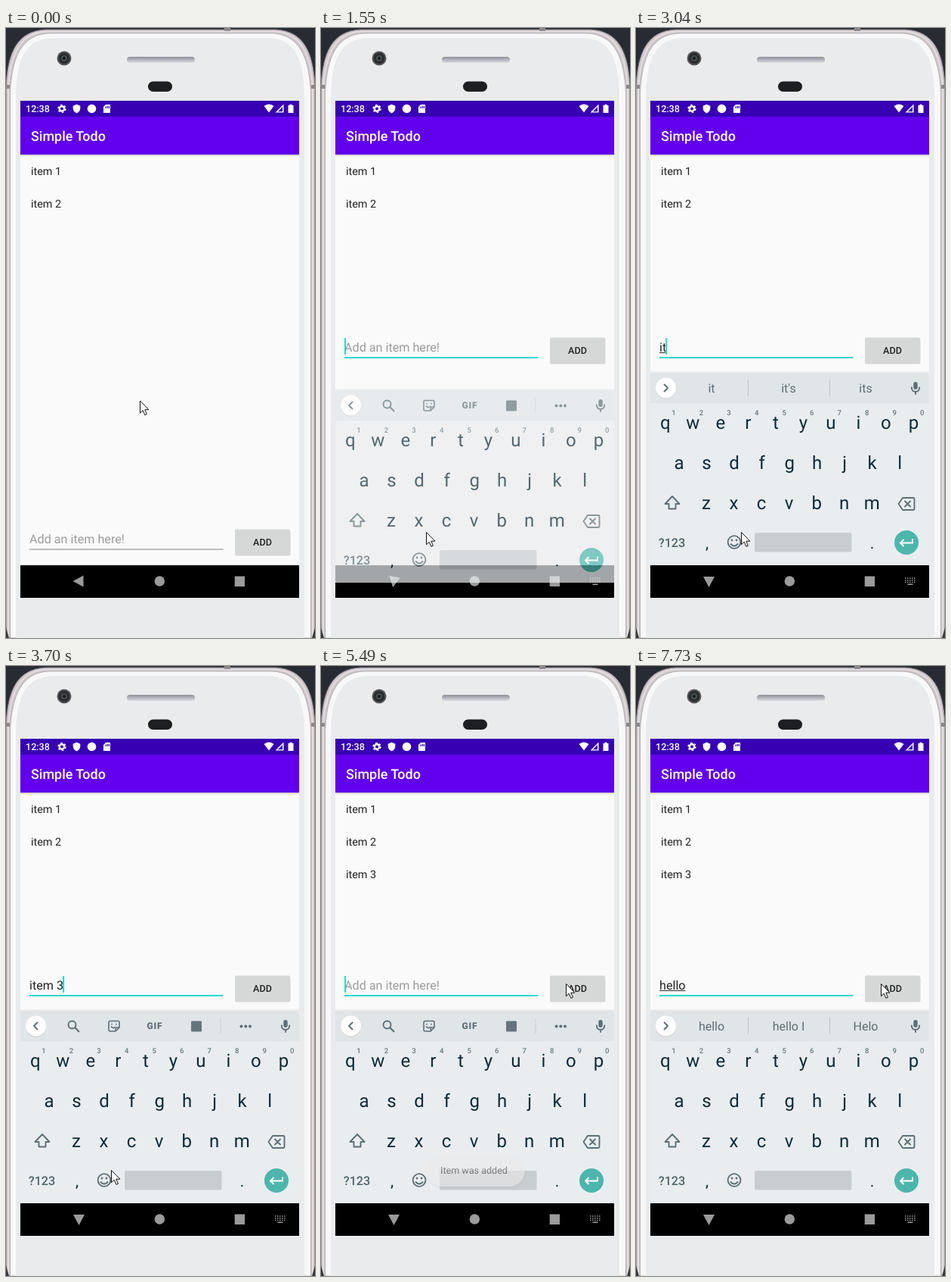
These frames come from a looping animation (409x805 px, 8000 ms). An HTML page:

```html
<!DOCTYPE html>
<html lang="en">
<head>
<meta charset="utf-8">
<title>Simple Todo</title>
<style>
html, body { margin: 0; width: 100%; height: 100%; overflow: hidden; background: #292b33; }
svg { display: block; width: 409px; height: 805px; font-family: Roboto, "Noto Sans", sans-serif; text-rendering: geometricPrecision; }
text { white-space: pre; }
.line { fill: none; stroke: #5f6f76; stroke-width: 1.9; stroke-linejoin: round; stroke-linecap: round; }
.mid { text-anchor: middle; }
.item { font-size: 14.4px; fill: #222; }
.field { font-size: 16.16px; }
.key { font-size: 24px; fill: #0f2b36; text-anchor: middle; }
.digit { font-size: 9.5px; fill: #687981; text-anchor: middle; font-weight: 500; }
.word { font-size: 16px; fill: #5f6d74; text-anchor: middle; }
</style>
</head>
<body>
<svg viewBox="0 0 409 805">
  <defs>
    <linearGradient id="slot" x2="0" y2="1">
      <stop stop-color="#8f9099"/><stop offset=".5" stop-color="#b3b5bd"/><stop offset="1" stop-color="#dcdee2"/>
    </linearGradient>
    <linearGradient id="drop" x2="0" y2="1">
      <stop stop-color="#000" stop-opacity=".2"/><stop offset="1" stop-color="#000" stop-opacity="0"/>
    </linearGradient>
    <clipPath id="screen"><path d="M19 96H388V752H19Z"/></clipPath>
  </defs>

  <!-- phone -->
  <path d="M0 805V78C2 30 16 4 52 2H357C393 4 407 30 409 78V805Z" fill="#cdc6c9" stroke="#77707a"/>
  <path d="M3 805V82C5 33 19 6 54 4.500H355C390 6 404 33 406 82V805" fill="none" stroke="#e3dde0" stroke-width="2"/>
  <path d="M5.500 805V85C8 36 22 9 56 7H353C387 9 401 36 403.500 85V805Z" fill="#f8f8f8" stroke="#aaa4a9" stroke-width=".8"/>
  <path d="M13 805V88C14 42 26 15 60 13H349C383 15 394 42 395 88V805Z" fill="#e9ebec"/>
  <path d="M0 75H5V80H0ZM404 75H409V80H404ZM289 0H297V4H289Z" fill="#8d888c"/>
  <path d="M0 791L4 805H0ZM409 791L405 805H409Z" fill="#393a3e"/>
  <circle cx="77" cy="40" r="9.500" fill="#57585c"/>
  <circle cx="77" cy="40" r="7.500" fill="#2b2c30"/>
  <circle cx="77" cy="40" r="4" fill="#44504f"/>
  <circle cx="77" cy="40" r="2" fill="#17191b"/>
  <rect x="160" y="38" width="90" height="8" rx="4" fill="url(#slot)"/>
  <rect x="188" y="70.500" width="32" height="13.500" rx="6.700" fill="#1d1e21"/>

  <g clip-path="url(#screen)">
    <path d="M19 96H388V752H19Z" fill="#fafafa"/>
    <path d="M19 167H388V170H19Z" fill="url(#drop)"/>
    <path d="M19 96H388V118H19Z" fill="#3700b3"/>
    <path d="M19 117H388V167H19Z" fill="#6200ee"/>
    <text x="33" y="149" font-size="17.960" font-weight="500" fill="#fff">Simple Todo</text>

    <!-- status bar -->
    <g fill="#fff">
      <text x="26" y="111.300" font-size="12.570" font-weight="500">12:38</text>
      <circle cx="74" cy="106.500" r="3.200" fill="none" stroke="#fff" stroke-width="2.400"/>
      <circle cx="74" cy="106.500" r="4.900" fill="none" stroke="#fff" stroke-width="1.600" stroke-dasharray="2.566"/>
      <path d="M93.500 100.700L98.300 102.700V106Q98 110.500 93.500 112.500Q89 110.500 88.700 106V102.700Z"/>
      <circle cx="113.500" cy="106.500" r="5.800"/>
      <path fill-rule="evenodd" d="M132 101H138V112H129V104ZM131.500 103.500V106H132.700V103.500ZM133.700 103V106H134.900V103ZM135.800 103V106H137V103Z"/>
      <path d="M341.500 103Q348 97.800 354.500 103L348 111.500Z"/>
      <path fill-rule="evenodd" d="M367.500 100.500V111.500H356.500ZM366 104L360 110.200H366Z"/>
      <path d="M373.500 102H375.500V100.700H378.500V102H380.500V112H373.500Z"/>
    </g>

    <text class="item" x="33" y="194.300">item 1</text>
    <text class="item" x="33" y="237.300">item 2</text>
    <text class="item" x="33" y="280.300" id="added">item 3</text>

    <!-- input row -->
    <g id="row">
      <text class="field" x="31" y="426.600" fill="#9c9c9c" id="hint">Add an item here!</text>
      <text class="field" x="31" y="426.600" fill="#222" id="typed"></text>
      <rect x="31" y="428" height="1" fill="#333" id="compose"/>
      <rect x="31" y="409" width="2" height="22" fill="#2bd8ca" id="caret"/>
      <rect x="31" width="256.500" id="rule"/>
      <rect x="303" y="410" width="73.500" height="33.500" rx="2" fill="#000" opacity=".14"/>
      <rect x="303" y="408.500" width="73" height="33.500" rx="2" id="button"/>
      <text class="mid" x="339.500" y="430" font-size="12.570" font-weight="500" fill="#222">ADD</text>
    </g>

    <!-- navigation bar -->
    <path d="M19 709H388V752H19Z" fill="#000"/>
    <g fill="#9b9b9b">
      <path d="M88.500 730L102.500 722.500V737.500Z" id="back"/>
      <circle cx="203.300" cy="730" r="6.700"/>
      <path d="M302.700 723.500H316V737H302.700Z"/>
      <g id="switch"></g>
    </g>

    <!-- keyboard -->
    <g id="board">
      <path d="M19 455H388V709H19Z" fill="#e9edf0"/>
      <path d="M19 455H388V495H19Z" fill="#e0e5e8"/>
      <path d="M19 453H388V455H19Z" fill="#000" opacity=".05"/>
      <circle cx="39.500" cy="476" r="13.500" fill="#000" opacity=".1"/>
      <circle cx="39.500" cy="475" r="13.500" fill="#fff"/>
      <path class="line" id="chevron"/>
      <g id="tools">
        <circle class="line" cx="87.500" cy="473.500" r="5"/>
        <path class="line" d="M91.300 477.300L96.300 482.300" style="stroke-width:2.200"/>
        <path class="line" d="M138 468.500H148Q150 468.500 150 470.500V477L145 482H138Q136 482 136 480V470.500Q136 468.500 138 468.500ZM150 477H146.500Q145 477 145 482M139.500 476Q142 479 144.500 476.500M140 472.500V473M146 472.500V473" style="stroke-width:1.600"/>
        <text class="mid" x="197" y="479.300" font-size="12" font-weight="900" letter-spacing=".8" fill="#5f6f76">GIF</text>
        <rect x="245" y="468.500" width="14" height="14" rx="1" fill="#66757c"/>
        <path d="M284 465V485" stroke="#c9d0d4"/>
        <g fill="#5f6f76"><circle cx="311.500" cy="475.500" r="2"/><circle cx="317.300" cy="475.500" r="2"/><circle cx="323" cy="475.500" r="2"/></g>
      </g>
      <g id="words">
        <path d="M148.500 464V486M256.500 464V486" stroke="#bcc5ca"/>
        <text class="word" x="100" y="481.300"></text>
        <text class="word" x="202" y="481.300"></text>
        <text class="word" x="304" y="481.300"></text>
      </g>
      <rect x="367.300" y="467" width="5.400" height="10" rx="2.700" fill="#5f6f76"/>
      <path class="line" d="M364.800 474.500Q365 480 370 480T375.200 474.500M370 480V483"/>
      <g id="keys"></g>
      <path class="line" d="M48 618L57.500 628H52.500V634.500H43.500V628H38.500Z"/>
      <path class="line" d="M353 620H367Q368.500 620 368.500 621.500V634.500Q368.500 636 367 636H353L347.500 628ZM356 624.500L363 631.500M363 624.500L356 631.500"/>
      <text class="mid" x="47.500" y="684.500" font-size="16.200" font-weight="500" fill="#52646c">?123</text>
      <text class="key" x="94" y="687" style="font-size:21px">,</text>
      <text class="key" x="312.500" y="687" style="font-size:21px">.</text>
      <circle class="line" cx="130" cy="678.500" r="8.400"/>
      <path class="line" d="M125.500 681Q130 686 134.500 681"/>
      <g fill="#5f6f76"><circle cx="127" cy="676" r="1.400"/><circle cx="133" cy="676" r="1.400"/></g>
      <rect x="157" y="666" width="128.500" height="25.500" rx="2.500" fill="#c8cdd0"/>
      <circle cx="358" cy="679" r="16" fill="#4db6ac"/>
      <path d="M366 674.500V679.500H350.500M354.500 675L350 679.500L354.500 684" fill="none" stroke="#fff" stroke-width="1.900"/>
    </g>

    <g id="toast">
      <rect x="138.500" y="646" width="132" height="42.500" rx="21" fill="#000" opacity=".05"/>
      <rect x="139" y="645" width="131" height="42" rx="21" fill="#ebebeb"/>
      <text x="158" y="670" font-size="12.570" fill="#303030">Item was added</text>
    </g>
  </g>

  <path id="mouse" d="M0 0V16.200L3.700 12.700L6.400 18.800L8.900 17.700L6.300 11.700H11.400Z" fill="#fff" stroke="#111" stroke-linejoin="round"/>
</svg>
<script>
const LOOP = 8000;
const $ = id => document.getElementById(id);

// Each table lists [start time, value...]; a value holds until the next row.
const mouse = [
  [0, 177.5, 492], [150, 170.5, 485], [460, 176.5, 515], [595, 177.5, 565], [730, 166.5, 620],
  [865, 148.5, 655], [1000, 139.5, 665.5], [4010, 139.5, 661], [4150, 139.5, 655], [4290, 139.5, 648],
  [4560, 165.5, 605], [4690, 226.5, 520], [4830, 298.5, 442], [4960, 324.5, 419.5]
];
const board = [[0, 0, 60], [1410, .3, 42], [1550, .7, 23], [1700, .94, 5], [1850, 1, 0]];
const caret = [
  [0, 0], [1280, 1], [1850, 0], [2400, 1], [4290, 0], [4690, 1], [5790, 0], [6220, 1], [7590, 0]
];
const toast = [
  [0, 0], [5490, .55], [5640, .85], [5790, 1], [7310, .8], [7450, .45], [7590, .15], [7730, 0]
];
const press = [[0, '#d6d7d7'], [5090, '#cacbcb'], [5220, '#c5c6c6'], [5360, '#d0d1d1'], [5490, '#d6d7d7']];
// text, suggestions
const typing = [
  [0, ''],
  [2770, 'i', 'i|I|in'],
  [3040, 'it', "it|it's|its"],
  [3160, 'ite', 'ite|item|items'],
  [3290, 'item', 'item|items|item I'],
  [3560, 'item ', 'is|in|and'],
  [3700, 'item 3'],
  [5220, ''],
  [6220, 'h', 'h|hey|he'],
  [6420, 'he', 'h|hey|he'],
  [6620, 'he', 'he|hey|hello'],
  [6740, 'hel', 'hel|hello|help'],
  [6890, 'hell', "hell|hello|he'll"],
  [7040, 'hello', 'hello|hello I|Helo']
];

function at(table, t) {
  let row = table[0];
  for (const r of table) if (r[0] <= t) row = r;
  return row.slice(1);
}

const label = (cls, x, y, s) => `<text class="${cls}" x="${x}" y="${y}">${s}</text>`;
const STEP = 36.53;
const keyRow = (s, x, y) => [...s].map((c, i) => label('key', x + STEP * i, y, c)).join('');
$('keys').innerHTML =
  keyRow('qwertyuiop', 38.7, 528.7) +
  keyRow('asdfghjkl', 57, 581.5) +
  keyRow('zxcvbnm', 93, 634.5) +
  [...'1234567890'].map((c, i) => label('digit', 50 + STEP * i, 511, c)).join('');

let dots = '<path d="M359.500 733.500H366.500V735H359.500Z"/>';
for (let i = 0; i < 15; i++) {
  dots += `<rect x="${356 + i % 5 * 3}" y="${725.3 + Math.floor(i / 5) * 2.7}" width="1.500" height="1.500"/>`;
}
$('switch').innerHTML = dots;

const show = (id, on) => { $(id).style.display = on ? '' : 'none'; };
const set = (id, attrs) => {
  for (const k in attrs) $(id).setAttribute(k, attrs[k]);
};
const wordSlots = document.querySelectorAll('.word');

function render(t) {
  const [mx, my] = at(mouse, t);
  set('mouse', { transform: `translate(${mx} ${my})` });

  const [alpha, drop] = at(board, t);
  set('board', { opacity: alpha, transform: `translate(0 ${drop})` });
  set('row', { transform: `translate(0 ${alpha ? 0 : 253})` });
  const turn = alpha < .3 ? 0 : alpha < .7 ? -45 : alpha < .9 ? -80 : -90;
  set('back', { transform: `rotate(${turn} 96.5 730)` });
  show('switch', alpha >= .7);

  const focus = t >= 1280;
  set('rule', { y: focus ? 434 : 434.3, height: focus ? 2 : 1.4, fill: focus ? '#2bd8ca' : '#a3a3a3' });

  const [text, words] = at(typing, t);
  $('typed').textContent = text;
  show('hint', !text);
  const width = text ? $('typed').getComputedTextLength() : 0;
  set('compose', { width: words && !text.endsWith(' ') ? width : 0 });
  set('caret', { x: 31 + Math.max(0, width - 1) });
  show('caret', at(caret, t)[0]);

  show('tools', !words);
  show('words', words);
  if (words) words.split('|').forEach((w, i) => { wordSlots[i].textContent = w; });
  set('chevron', { d: words ? 'M37.5 470.500L42 475L37.500 479.500' : 'M41.500 470.500L37 475L41.500 479.500' });

  show('added', t >= 5220);
  set('button', { fill: at(press, t)[0] });
  set('toast', { opacity: at(toast, t)[0] });
}

const start = performance.now();
function frame() {
  render((performance.now() - start) % LOOP);
  requestAnimationFrame(frame);
}
frame();
</script>
</body>
</html>
```
